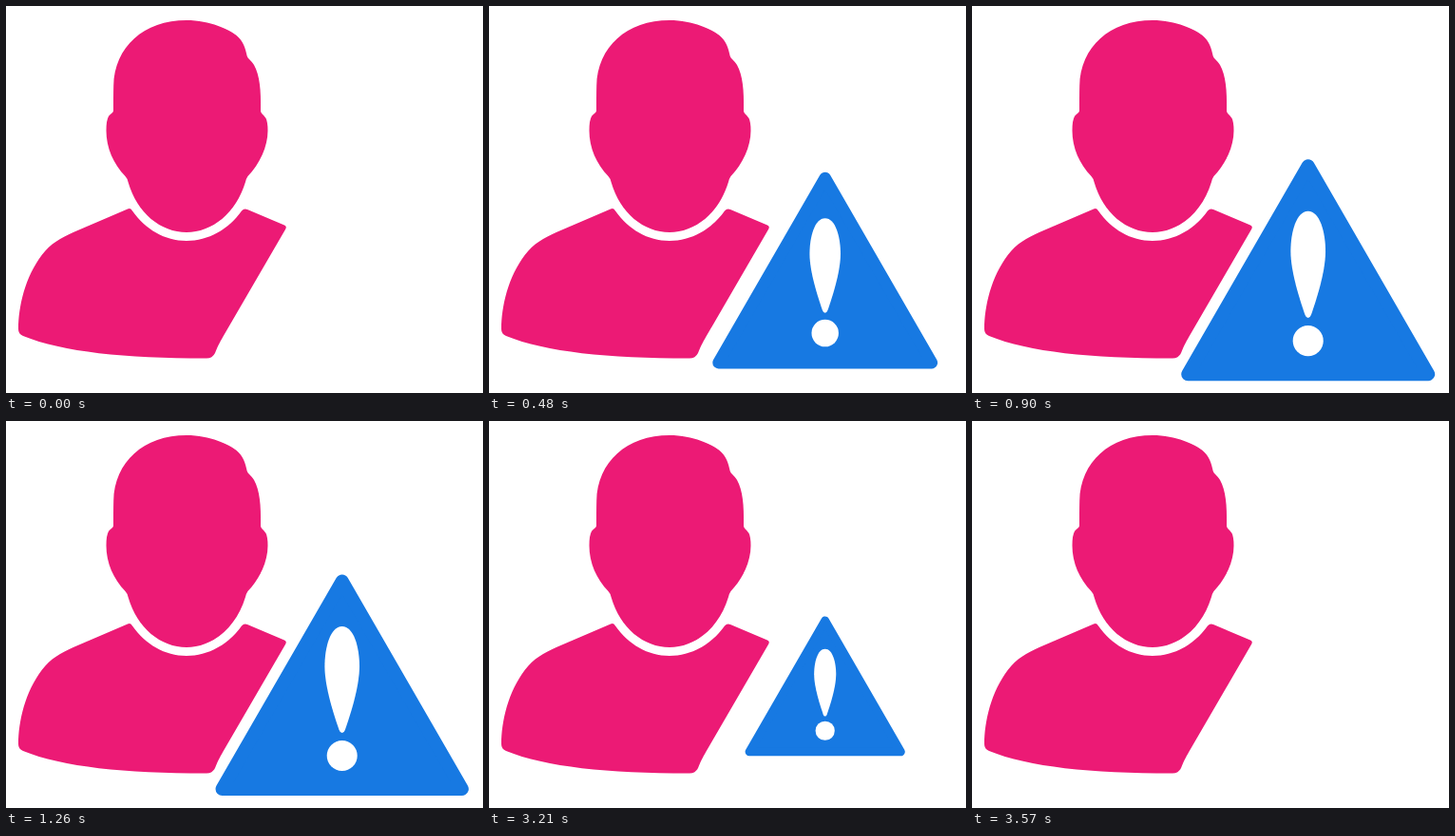
Animation of 502 by 407 pixels, one loop 3.6 s. Source, as an HTML page:

```html
<!DOCTYPE html>
<html lang="en">
<head>
<meta charset="utf-8">
<title>User warning</title>
<style>
  html, body { margin: 0; width: 100%; height: 100%; overflow: hidden; background: #fff; }
  svg { display: block; width: 502px; height: 407px; }
  .user { fill: #ec1a75; }
  .sign { fill: #1779e2; stroke: #1779e2; stroke-width: 14; stroke-linejoin: round; }
  .mark { fill: #fff; }
</style>
</head>
<body>
<svg viewBox="0 0 502 407">
  <g class="user">
    <path d="M190 15C215 15 235 25 242 30.500C250 37 252 45 253.500 52C254 55 258 57 261 62C267 73 268.500 88 268 110C268 113 271 114 273.500 118Q275.500 122 275.500 131C275.500 148 267 166 254.500 179Q253 181 252 185C242 218 217 238 190 238C163 238 138 218 128.500 185Q127.500 181 125.500 179C113 166 105.500 149 105.500 131Q105.500 120 108 116C110 113 113 112.500 113 110C113 100 113 92 113.200 84C114 43 145 15 190 15Z"/>
    <path d="M128 213.500L72 237.500C57 244 47 250 38 261.500C20 285 13 316 13 340Q13 345 18 347C60 364 125 370.500 210 370.500Q217 371 220 365C223 357 226 352 230 345L294 235Q296 232 293 230.500L254 214Q250.500 212.500 248 215.500C234 235 213 247 190 247C167 247 147 235 133 215.500Q131 212 128 213.500Z"/>
  </g>
  <g id="alert" transform="scale(0)">
    <path class="sign" d="M353.700 168.500L479.900 387H227.500Z"/>
    <path class="mark" d="M353.700 216C366 216 372 238 372 258C372 280 362 310 356.800 325Q355.700 328 353.700 328Q351.700 328 350.600 325C345.400 310 335.400 280 335.400 258C335.400 238 341.400 216 353.700 216Z"/>
    <circle class="mark" cx="353.700" cy="352" r="16"/>
  </g>
</svg>
<script>
  const LOOP = 3600, STEP = 30;
  const GROWN = 540, SETTLED = 1260, LEAVE = 3000, GONE = 3570;
  const CX = 353.7, CY = 280.7;
  const alertSign = document.getElementById('alert');

  // Linear growth, damped wobble, hold, linear shrink.
  function scaleAt(ms) {
    if (ms < GROWN) return ms / GROWN;
    if (ms < SETTLED) {
      const s = (ms - GROWN) / 1000;
      return 1 + 0.16 * Math.exp(-9.2 * s) * Math.sin(8 * Math.PI * s);
    }
    if (ms < LEAVE) return 1;
    return Math.max(0, (GONE - ms) / (GONE - LEAVE));
  }

  const start = performance.now();
  function draw() {
    const ms = (performance.now() - start) % LOOP;
    const k = scaleAt(Math.floor(ms / STEP) * STEP);
    alertSign.setAttribute('transform', `translate(${CX} ${CY}) scale(${k}) translate(${-CX} ${-CY})`);
    requestAnimationFrame(draw);
  }
  draw();
</script>
</body>
</html>
```
